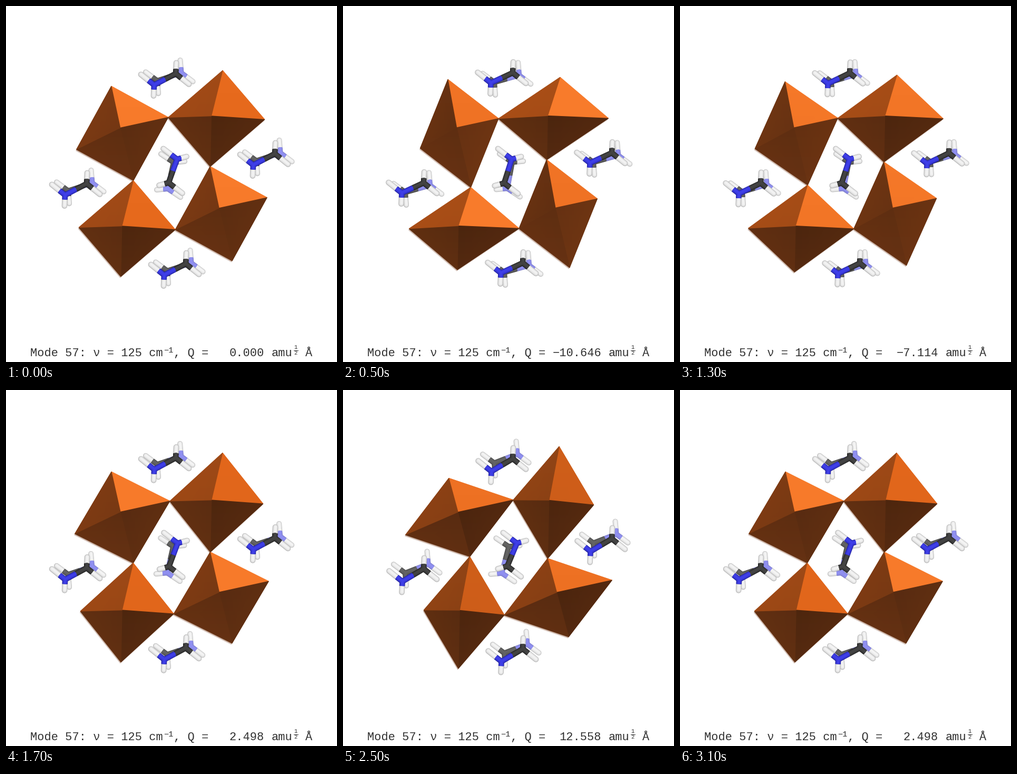
Write a matplotlib script that moves like this. It is 628 px wide and 676 px high and loops after 3200 ms.

```python
import numpy as np
import matplotlib.pyplot as plt
from matplotlib.animation import FuncAnimation
from matplotlib.collections import PolyCollection
from matplotlib.colors import LinearSegmentedColormap
from matplotlib.tri import Triangulation

W, H, DPI = 628, 676, 100
FRAMES, INTERVAL = 32, 100
AMPLITUDE = 12.804
INK = "#303030"


def vec(*xs):
    return np.array(xs, float)


def unit(v):
    return v / np.linalg.norm(v)


fig = plt.figure(figsize=(W / DPI, H / DPI), dpi=DPI, facecolor="white")
ax = fig.add_axes([0, 0, 1, 1])

# ---- octahedra: two kinds that shear in opposite senses ----
CENTRE = vec(314.5, 318)
ARM = 92
SHEAR_X, SHEAR_Y, SHEAR_TIP = vec(15.4, -2.7), vec(1, 15.5), vec(1.4, .5)
# offset from the centre, half axes, tip offset, sense of the shear
KINDS = [
    (vec(93.7, 76.2), vec(87.2, -30.5), vec(-21, -89.7), vec(-4, -10.5), 1),
    (vec(-84.8, 104.5), vec(91.6, 2), vec(11.8, -91.2), vec(-9.7, -4.7), -1),
]

HEAD_LIGHT = unit(vec(-.1, -.1, 1))
KEY_LIGHT = unit(vec(1, -2, .5))
HALF_WAY = unit(KEY_LIGHT + vec(0, 0, 1))
FOG = .05

orange = LinearSegmentedColormap.from_list("orange", [
    (0, (0, 0, 0)),
    (.35, (.345, .17, .065)),
    (.9, (.895, .405, .105)),
    (1, (1, .51, .19)),
])


def octahedra(s):
    """Pairs of a rim with four corners and the tip that faces the viewer."""
    for offset, x, y, tip, sense in KINDS:
        x, y = x + sense * s * SHEAR_X, y + sense * s * SHEAR_Y
        for side in (-1, 1):
            c = CENTRE + side * offset
            yield np.array([c + y, c + x, c - y, c - x]), c + tip + s * SHEAR_TIP


def brightness(p, q, tip):
    edge, rise = np.append(q - p, 0), np.append(tip - p, ARM)
    n = unit(np.cross(edge, rise))
    n *= np.sign(n[2])
    lit = .62 * max(n @ HEAD_LIGHT, 0) + .55 * max(n @ KEY_LIGHT, 0)
    return min(lit + .25 * max(n @ HALF_WAY, 0) ** 20, 1)


def faces(s):
    points, shades = [], []
    for rim, tip in octahedra(s):
        for p, q in zip(rim, np.roll(rim, -1, axis=0)):
            v = brightness(p, q, tip)
            far = v + FOG * (1 - v)
            points += [p, q, tip]
            shades += [far, far, v]
    return np.array(points), np.array(shades)


def rims(s):
    """Silhouettes, the farther ones slipping out at the lower left."""
    return [rim + d * vec(-.5, 1) for d in (3, 2, 1, 0) for rim, _ in octahedra(s)]


# ---- molecules: two ends, each with two hydrogen arms ----
class Molecule:
    def __init__(self, kinds, ends, drift, arms, fog, radius):
        self.kinds, self.fog, self.radius = kinds, fog, radius
        self.ends, self.drift, self.arms = map(np.array, (ends, drift, arms))

    def moved(self, offset):
        return Molecule(self.kinds, self.ends + offset, self.drift,
                        self.arms, self.fog, self.radius)

    def halves(self, s):
        """Groups of half bonds, each (kind, fog, pairs of end and middle)."""
        ends = self.ends + s * self.drift
        centre = ends.mean(axis=0)
        hydrogens, heavy = [], []
        for kind, fog, end, sign in zip(self.kinds, self.fog, ends, (1, -1)):
            bonds = [(end, centre)]
            for arm in sign * self.arms:
                joint = end + .42 * arm
                bonds.append((end, joint))
                hydrogens.append(("H", fog * .3, [(end + arm, joint)]))
            heavy.append((kind, fog, bonds))
        return hydrogens + heavy[::-1]


NEAR = dict(kinds="NC", fog=(0, 0), radius=5.3)
FAR = dict(kinds="CN", fog=(.17, .42), radius=5)
front = Molecule(ends=[(281, 150), (322, 128.5)], drift=[(.6, 4.7), (0, 2)],
                 arms=[(-25, -20), (-1, 20.5)], **NEAR)
back = Molecule(ends=[(287, 142), (332.5, 127)], drift=[(0, -3.4), (-2, -5.5)],
                arms=[(-22, -16.5), (2, 24)], **FAR)
mid_front = Molecule(ends=[(324.5, 291), (308.5, 335.5)], drift=[(5.4, 0), (3.3, -1)],
                     arms=[(-26, -20), (18, -5)], **NEAR)
mid_back = Molecule(ends=[(318, 297), (307, 347)], drift=[(-3.6, .4), (-5.8, .8)],
                    arms=[(-24, -16), (21, -2)], **FAR)

CELL_A, CELL_B = vec(188, 152), vec(-169, 209)
CELLS = [i * CELL_A + j * CELL_B for i in (0, 1) for j in (0, 1)]
MOLECULES = [back.moved(c) for c in CELLS] + [mid_back]
MOLECULES += [front.moved(c) for c in CELLS] + [mid_front]

RIM = {"N": vec(.12, .12, .60), "C": vec(.11, .11, .11), "H": vec(.70, .70, .70)}
CORE = {"N": vec(.25, .25, .92), "C": vec(.27, .27, .27), "H": vec(.96, .96, .96)}
LAYERS = np.linspace(1, .2, 7)
ARC = np.linspace(np.pi / 2, 3 * np.pi / 2, 11)


def half_stick(p, q, r):
    """Outline with a round end at p and a flat end at q."""
    u = unit(q - p)
    n = vec(-u[1], u[0])
    cap = p + r * (np.outer(np.cos(ARC), u) + np.outer(np.sin(ARC), n))
    return np.vstack([cap, q - r * n, q + r * n])


def sticks_at(s):
    shapes, colors = [], []
    for mol in MOLECULES:
        for kind, fog, bonds in mol.halves(s):
            for scale in LAYERS:
                glint = (1 - scale) * vec(.7, -1.2)
                c = RIM[kind] + np.sqrt(1 - scale ** 2) * (CORE[kind] - RIM[kind])
                for p, q in bonds:
                    shapes.append(half_stick(p + glint, q + glint, mol.radius * scale))
                    colors.append(c + fog * (1 - c))
    return shapes, colors


points, shades = faces(0)
tri = Triangulation(*points.T.copy(), np.arange(len(points)).reshape(-1, 3))
mesh = ax.tripcolor(tri, shades, shading="gouraud", cmap=orange, vmin=0, vmax=1, zorder=2)

brown = vec(.45, .22, .09)
rim_colors = [brown + f * (1 - brown) for f in (.8, .62, .42, 0) for _ in range(4)]
body = ax.add_collection(PolyCollection(rims(0), facecolors=rim_colors,
                                        linewidths=0, zorder=1))
shapes, colors = sticks_at(0)
sticks = ax.add_collection(PolyCollection(shapes, facecolors=colors,
                                          linewidths=0, zorder=3))
ax.set(xlim=(0, W), ylim=(H, 0))
ax.axis("off")


def label(x, y, text, px=22, **kw):
    return ax.text(x, y, text, family="Liberation Mono", size=px * 72 / DPI,
                   color=INK, va="baseline", **kw)


label(46, 665, "Mode 57: ν = 125 cm")
label(299, 658, "\u22121", 15.4)
label(318.5, 665, ", Q =")
value = label(490.2, 665, "", ha="right")
label(503.3, 665, "amu")
label(549.7, 651, "1", 10.5, ha="center")
label(549.7, 662, "2", 10.5, ha="center")
ax.plot([545.5, 554], [653.5, 653.5], color=INK, lw=.7)
label(567.5, 665, "Å")


def update(k):
    s = -np.sin(2 * np.pi * k / FRAMES)
    points, shades = faces(s)
    tri.x[:], tri.y[:] = points.T
    mesh.set_array(shades)
    body.set_verts(rims(s))
    sticks.set_verts(sticks_at(s)[0])
    q = round(AMPLITUDE * s, 3) + 0.0
    value.set_text(f"{q:.3f}".replace("-", "\u2212"))
    return mesh, body, sticks, value


anim = FuncAnimation(fig, update, frames=FRAMES, interval=INTERVAL,
                     init_func=lambda: update(0), repeat=True, repeat_delay=0)
plt.show()
```
